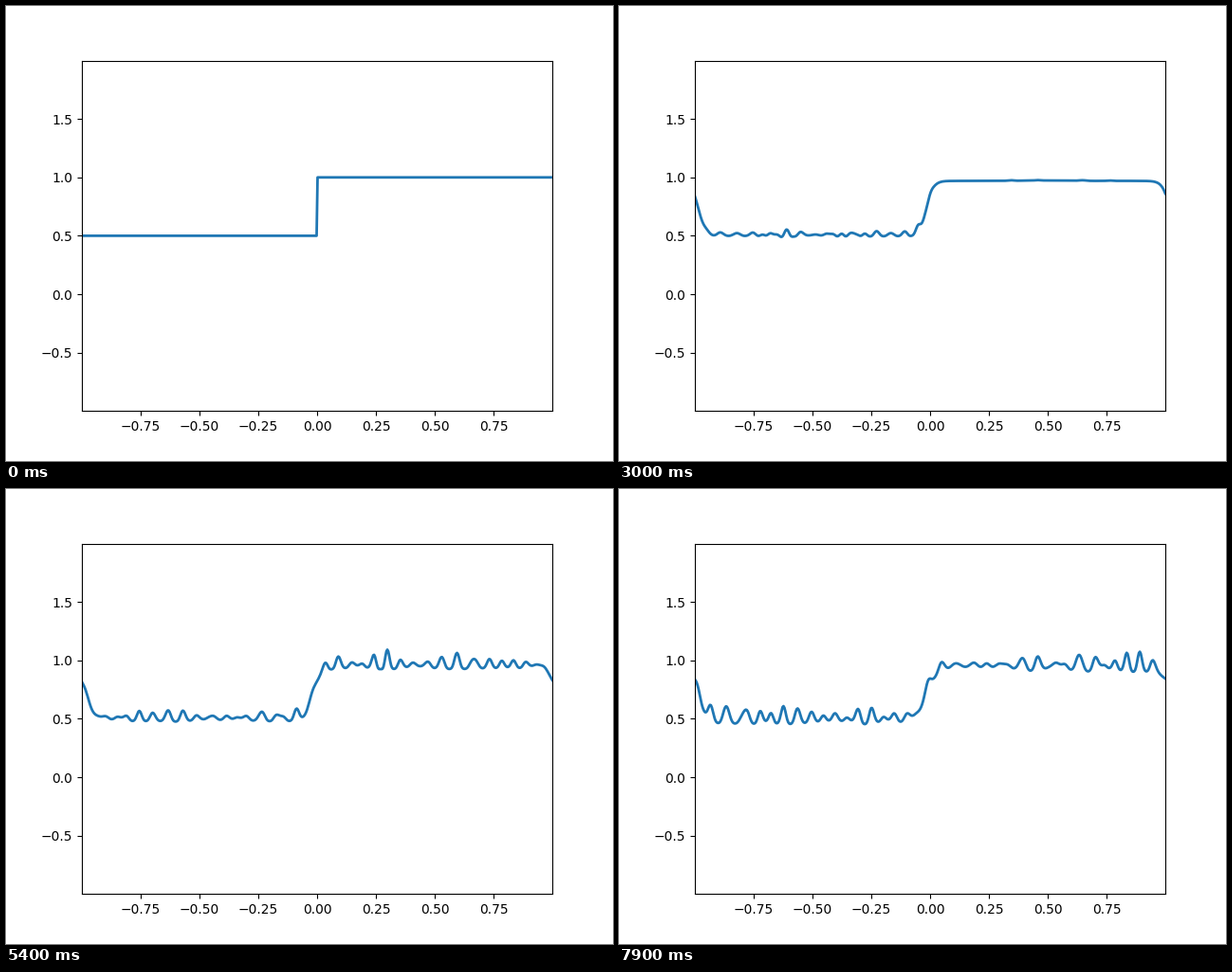
These frames come from a looping animation (640x480 px, 8 s). A matplotlib script:

```python
import matplotlib.pyplot as plt
import numpy as np
from matplotlib.animation import FuncAnimation

FRAMES, INTERVAL = 80, 100
CELLS = 500
SPEED = 0.217  # wave speed, x units per second
MEET = 2.3     # when waves from both edges meet mid-plateau

x = (np.arange(CELLS) + 0.5) * 2 / CELLS - 1

# Periodic modes, each one running left and right with random phases
rng = np.random.default_rng(4)
modes = np.arange(14, 56)[:, None]
weights = np.exp(-((modes - 32) / 11) ** 2)
weights /= np.sqrt(np.sum(weights ** 2))
phases = rng.uniform(0, 2 * np.pi, (2, len(modes), 1))


def gauss(x, centre, width):
    return np.exp(-((x - centre) / width) ** 2)


def smooth(t, start, end):
    s = np.clip((t - start) / (end - start), 0, 1)
    return s * s * (3 - 2 * s)


def wrap(x):
    return (x + 1) % 2 - 1


def packet(x):
    """First ripples, as they look in the middle of each half."""
    left = 0.022 * gauss(x, -0.51, 0.07) * np.cos(2 * np.pi * (x + 0.493) / 0.035)
    return left + 0.013 * gauss(x, 0.495, 0.02) + 0.008 * gauss(x, 0.61, 0.015)


def first_ripples(t):
    shift = SPEED * (t - MEET)
    both = packet(wrap(x - shift)) + packet(wrap(x + shift))
    return min(t, 1) * (1 - smooth(t, 2.6, 4)) * both / 2


def noise(t):
    """Counter-running random waves with crests sharper than troughs."""
    right = np.cos(np.pi * modes * (x - SPEED * t) + phases[0])
    left = np.cos(np.pi * modes * (x + SPEED * t) + phases[1])
    n = np.sum(weights * (right + left), axis=0)
    return n + 0.15 * (n * n - 1)


def profile(t):
    """Periodic step whose edges soften while waves build up on it."""
    low = 0.512 - 0.012 * np.exp(-t)
    high = 0.966 + 0.034 * np.exp(-t / 1.4)
    soft = 1 - np.exp(-t / 0.4)
    width = 2e-4 + 0.025 * soft + 0.0019 * t
    dist = np.abs(wrap(x - 0.5))
    step = (1 + np.tanh((0.5 + 0.016 * soft - dist) / width)) / 2

    # Raised plateau spreading from the middle of the upper half
    reach = 0.168 * max(t - MEET, 0)
    dome = (1 + np.tanh((reach - np.abs(x - 0.5)) / 0.02)) / 2
    dome *= 0.024 * gauss(t, 3.7, 0.5)

    calm = 0.018 * smooth(t, 2.2, 3.5) + 0.017 * smooth(t, 4.5, 8)
    rough = 0.008 * smooth(t, 3, 4.6) + 0.03 * smooth(t, 4.6, 6.2)
    height = calm + (rough - calm) * step
    return low + (high - low) * step + dome + first_ripples(t) + height * noise(t)


fig, ax = plt.subplots(figsize=(6.4, 4.8), dpi=100)
ax.set_xlim(x[0], x[-1])
ax.set_ylim(-1, 2)
ax.set_xticks(np.arange(-0.75, 0.8, 0.25))
ax.set_yticks(np.arange(-0.5, 1.6, 0.5))
line, = ax.plot(x, profile(0), lw=2)


def update(frame):
    line.set_ydata(profile(frame * INTERVAL / 1000))
    return line,


anim = FuncAnimation(fig, update, frames=FRAMES, interval=INTERVAL,
                     repeat=True, repeat_delay=0)
plt.show()
```
